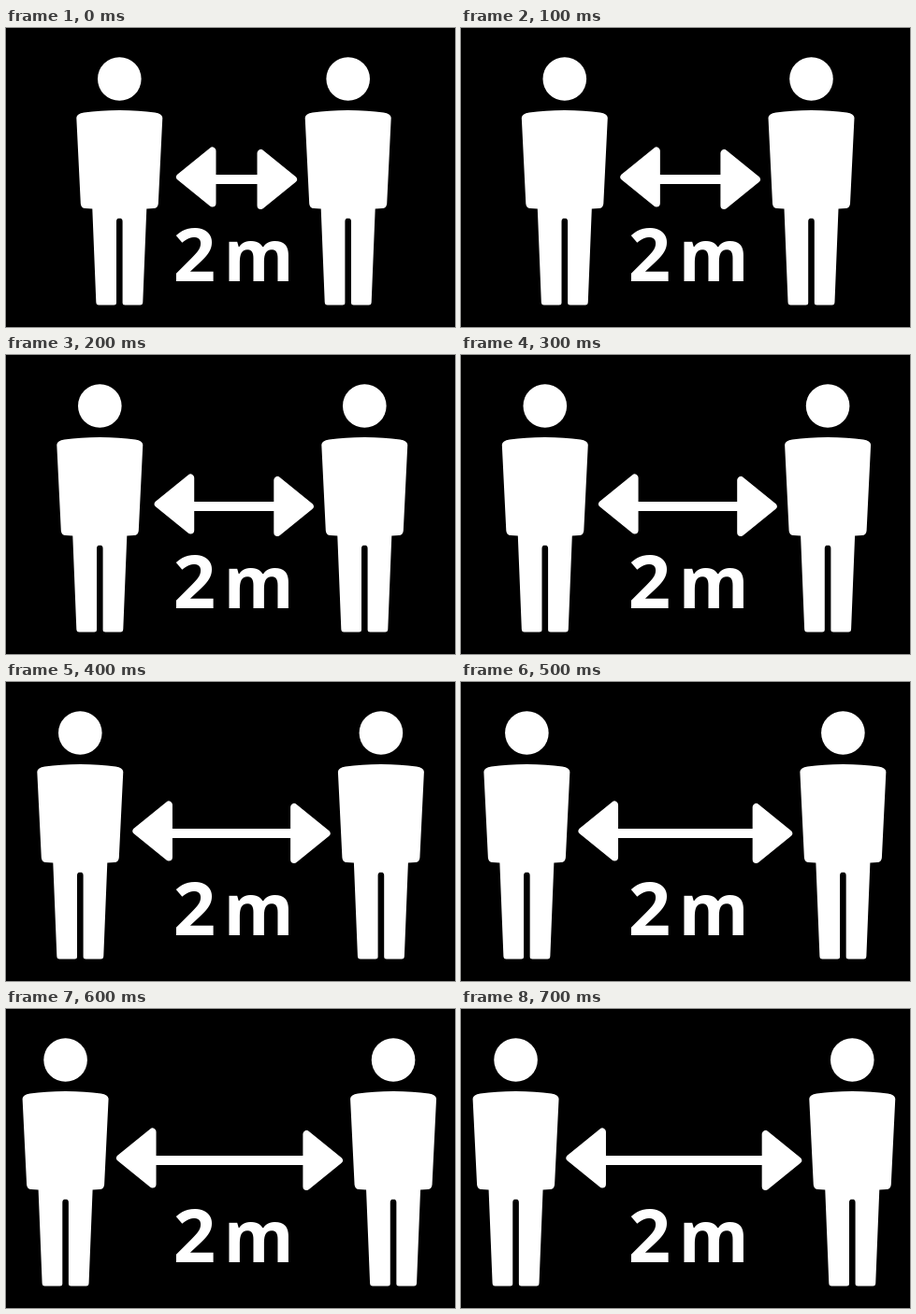
These frames come from a looping animation (480x320 px, 800 ms). An HTML page:

```html
<!DOCTYPE html>
<html lang="en">
<head>
<meta charset="utf-8">
<title>Keep 2 m apart</title>
<style>
  html, body { margin: 0; width: 100%; height: 100%; overflow: hidden; background: #000; }
  svg { display: block; width: 480px; height: 320px; }
  text { font-family: "Open Sans", "Noto Sans", sans-serif; font-weight: 700; }
</style>
</head>
<body>
<svg viewBox="0 0 480 320" fill="#fff">
  <defs>
    <path id="half" d="M-1 88 H0 Q21 88 38 90.500 Q45.500 91.500 46 96 L41.500 188 Q41 193 36.500 193
      L29 193.500 L25 293 Q25 296.500 22 296.500 H6 Q3.300 296.500 3.300 294 V207 Q3.300 203.500 0 203.500 H-1 Z"/>
    <g id="person">
      <circle cy="54.500" r="23.300"/>
      <use href="#half"/>
      <use href="#half" transform="scale(-1 1)"/>
    </g>
    <path id="tip" d="M5 0 L39.500 -28 V28 Z" stroke="#fff" stroke-width="8" stroke-linejoin="round"/>
  </defs>
  <use id="left" href="#person"/>
  <use id="right" href="#person"/>
  <path id="bar" stroke="#fff" stroke-width="10"/>
  <use id="tipL" href="#tip"/>
  <use id="tipR" href="#tip"/>
  <text x="178.700" y="271" font-size="79.500">2</text>
  <text x="232.500" y="271" font-size="76.500">m</text>
</svg>
<script>
  const STEP = 100, STEPS = 8, SLOW_FROM = 4;
  const get = id => document.getElementById(id);
  const [left, right, tipL, tipR, bar] = ["left", "right", "tipL", "tipR", "bar"].map(get);
  const place = (el, x, y = 0, flip = 1) =>
    el.setAttribute("transform", `translate(${x} ${y}) scale(${flip} 1)`);

  // steady spread, slowing down in the second half
  const spread = n => n - 0.15 * Math.max(0, n - SLOW_FROM) ** 1.75;

  function draw() {
    const s = spread(Math.floor(performance.now() / STEP) % STEPS);
    const xL = 181 - 11.64 * s, xR = 312 + 8.9 * s;
    place(left, 121.3 - 10.5 * s);
    place(right, 365.7 + 8.8 * s);
    place(tipL, xL, 159.5);
    place(tipR, xR, 162, -1);
    bar.setAttribute("d", `M${xL + 38} 162 H${xR - 38}`);
    requestAnimationFrame(draw);
  }
  draw();
</script>
</body>
</html>
```
